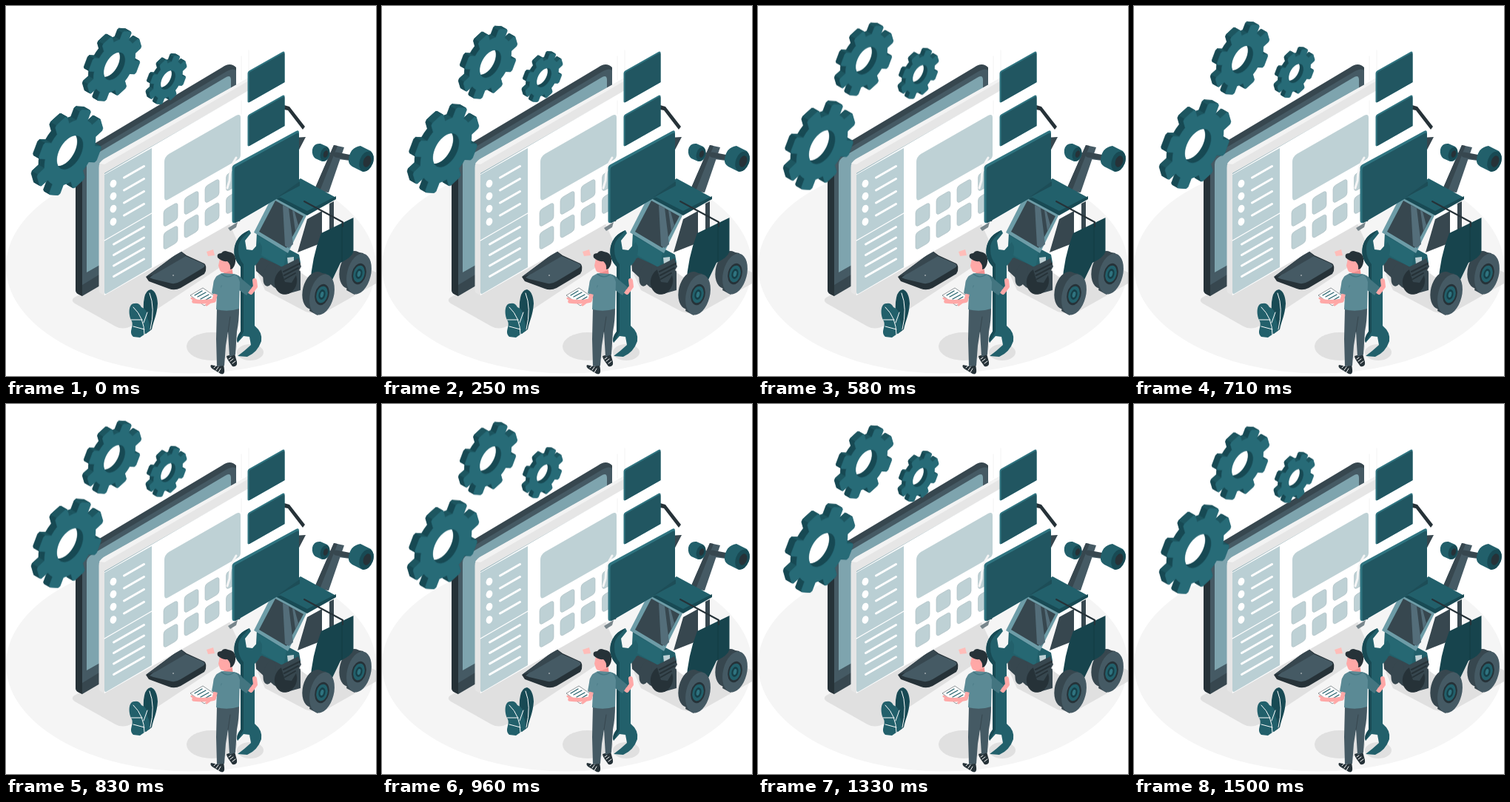
Write an HTML page that moves like this. It is 500 px wide and 500 px high and loops after 1.54 s.

```html
<!DOCTYPE html>
<html lang="en">
<head>
<meta charset="utf-8">
<title>Isometric workshop</title>
<style>
html, body { margin: 0; width: 100%; height: 100%; overflow: hidden; background: #fff; }
svg { display: block; width: 100vw; height: 100vh; }
.ln { fill: none; stroke-linecap: round; stroke-linejoin: round; }
#gears { animation: bob 1540ms linear -65ms infinite; }
@keyframes bob { 50% { transform: translateY(-10px); } }
</style>
</head>
<body>
<svg viewBox="0 0 500 500">
  <defs>
    <rect id="tile" x="-9.5" y="-11.5" width="19" height="23" rx="4" transform="skewY(-30)" fill="#bed1d5" stroke="#aebfc4" stroke-width=".6"/>
    <ellipse id="dot" rx="4.2" ry="5.4" transform="rotate(22)" fill="#fff"/>
    <g id="wheel">
      <g fill="#37474f">
        <ellipse cx="-11" cy="-3" rx="16" ry="26" transform="rotate(14)"/>
        <path d="M6-28L-5-30L-17 22L-6 28Z"/>
      </g>
      <g transform="rotate(14)">
        <ellipse rx="16" ry="28" fill="#455a64"/>
        <ellipse rx="9.5" ry="14.5" fill="#263238"/>
        <ellipse rx="7.5" ry="11.5" fill="#22606b"/>
        <ellipse rx="4.5" ry="7" fill="#173f48"/>
        <ellipse rx="2.2" ry="4" fill="#2f7480"/>
      </g>
    </g>
    <g id="slab">
      <path d="M-.5 29Q-.5 26.500 1.500 25.500L47 -.3Q49.500-1.300 49.500 1V41L2 68Q-.5 69.300-.5 67Z" fill="#2f7480"/>
      <path d="M1.500 30Q1.500 28 3 27L47.500 1.800Q49.500 1 49.500 3V41L1.500 68.300Z" fill="#215661"/>
    </g>
  </defs>

  <g id="ground">
    <ellipse cx="250" cy="352" rx="250" ry="144.5" fill="#f5f5f5"/>
    <g fill="#e0e0e0">
      <path d="M92 394L200 335L300 290L318 330L303 344L172 431Q159 439 148 433L93 402Q87 398 92 394Z"/>
      <path d="M340 362L440 330L500 360V375L436 411Q424 419 405 413L350 384Z"/>
      <ellipse cx="278" cy="460" rx="34" ry="19"/>
      <ellipse cx="330" cy="468" rx="18" ry="11"/>
    </g>
  </g>

  <g id="monitor">
    <path d="M94 208Q94 202 101 197L292 83Q303 75 311 83V270L103 392L97 389Q94 387 94 383Z" fill="#37474f"/>
    <path d="M94 208L103 212V392L97 389Q94 387 94 383Z" fill="#263238"/>
    <path d="M103 212Q103 204 110 200L297 89Q307 83 311 87V250L103 377Z" fill="#455a64"/>
    <path d="M109 214Q109 208 115 204L296 97Q304 92 304 100V250L109 360Z" fill="#7ea4ae"/>
    <path d="M189 366L236 331L244 337L268 348Q271 350 270 358L268 362L236 381Q228 385 220 382L193 372Z" fill="#263238"/>
    <path d="M194 367L236 334L243 338L266 348Q271 351 266 354L236 372Q228 377 220 374L199 369Z" fill="#455a64"/>
    <path d="M189 366L236 331L243 338L202 362Z" fill="#37474f"/>
    <circle cx="226" cy="364" r=".8" fill="#e0e0e0"/>
  </g>

  <g id="window">
    <path d="M125.5 219Q125 211 132 207L328 97V115L133 226V391L127.500 388Q125.500 387 125.500 384Z" fill="#e6e6e6"/>
    <path d="M126 213L132 207L328 97V101L133 214Z" fill="#f3f3f3"/>
    <path d="M133 227L328 114V280L133 391Z" fill="#fff"/>
    <path d="M133 228L197 192V353L137 388Q133 391 133 386Z" fill="#bacfd4"/>
    <path class="ln" d="M133 317L197 280" stroke="#fff" stroke-width="1.3"/>
    <use href="#dot" transform="translate(145 240)"/>
    <use href="#dot" transform="translate(145 257)"/>
    <use href="#dot" transform="translate(145 274)"/>
    <use href="#dot" transform="translate(145 291.500)"/>
    <path class="ln" stroke="#fff" stroke-width="3" d="M159.500 232l27-15.500m-27 32.500l27-15.500m-27 32.500l27-15.500m-27 32.500l27-15.500M145.500 322l41-23.500m-41 38l41-23.500m-41 38l41-23.500m-41 38l41-23.500"/>
    <path d="M214 211Q214 204 220 200L311 148Q317 145 317 151V201Q317 206 313 208L220 261Q214 265 214 258Z" fill="#bed1d5"/>
    <use href="#tile" transform="translate(222.500 282)"/>
    <use href="#tile" transform="translate(250.500 266)"/>
    <use href="#tile" transform="translate(278.500 250)"/>
    <use href="#tile" transform="translate(307 234)"/>
    <use href="#tile" transform="translate(222.500 313)"/>
    <use href="#tile" transform="translate(250.500 297.500)"/>
    <use href="#tile" transform="translate(278.500 281.500)"/>
    <use href="#tile" transform="translate(307 265)"/>
    <path class="ln" d="M311 205Q302 218 302 236L299 246" stroke="#f5f5f5" stroke-width="3"/>
    <path class="ln" d="M318 68V100M328 60V96M318 128V146" stroke="#f7f7f7" stroke-width="1.5"/>
  </g>

  <g id="loader">
    <path d="M376 134L383 136L404 163L401 167L381 141L376 140Z" fill="#263238"/>
    <path d="M388 178L405 177L393 200Z" fill="#37474f"/>
    <path class="ln" d="M424 200L484 208" stroke="#455a64" stroke-width="7"/>
    <path d="M443 188L457 191L436 252L416 250Z" fill="#455a64"/>
    <path d="M443 188L448 189L424 250H416Z" fill="#37474f"/>
    <path class="ln" d="M446 201L472 206" stroke="#37474f" stroke-width="7"/>
    <path d="M414 194Q416 185 425 186L434 190Q439 194 437 203Q434 211 427 210L418 206Q413 202 414 194Z" fill="#22606b"/>
    <ellipse cx="431" cy="200" rx="6" ry="9.500" transform="rotate(18 431 200)" fill="#184a54"/>
    <ellipse cx="432" cy="200" rx="3" ry="5" transform="rotate(18 432 200)" fill="#263238"/>
    <path d="M463 207Q465 191 479 189L493 196Q499 202 496 212Q490 225 482 224L468 217Q462 213 463 207Z" fill="#22606b"/>
    <ellipse cx="487" cy="210" rx="9" ry="14" transform="rotate(20 487 210)" fill="#184a54"/>
    <ellipse cx="488" cy="210" rx="5" ry="8" transform="rotate(20 488 210)" fill="#263238"/>

    <path d="M337 345L346 338L398 358V384L380 389L362 380L338 358Z" fill="#37474f"/>
    <ellipse cx="356" cy="363" rx="8" ry="16" transform="rotate(14 356 363)" fill="#37474f"/>
    <ellipse cx="378" cy="372" rx="15" ry="18" transform="rotate(14 378 372)" fill="#263238"/>
    <use href="#wheel" transform="translate(477 362)"/>
    <path d="M407 282L443 264V326L415 372L398 360L394 333Z" fill="#fff"/>
    <path d="M407 288L427 277V320L394 333Z" fill="#37474f"/>
    <path d="M437 267L443 264V306L437 310Z" fill="#37474f"/>
    <path d="M426 307L469.500 286V332Q467 340 452 347L440 372L411 378Q413 340 426 307Z" fill="#17444d"/>
    <path class="ln" d="M454 293V345" stroke="#123b43" stroke-width="1"/>
    <path d="M339 306L396 336L398 347L377 354L346 340L337 344Z" fill="#22606b"/>
    <path d="M339 310L379 333L375 354L340 334Z" fill="#266873"/>
    <path d="M380 340L389 339V346L381 349Z" fill="#bed1d5"/>
    <path d="M371 353L395 341L399 352L386 374L377 373Z" fill="#37474f"/>
    <path class="ln" d="M375 359L397 348M376 364L395 354M377 369L391 361" stroke="#263238" stroke-width="2"/>
    <path d="M361 255L407 281L381 334L335 306Z" fill="#6d9ca7"/>
    <path d="M364 263L402 284L379 327L342 305Z" fill="#37474f"/>
    <path d="M374 269L382 273L388 322L382 327L377 324ZM387 276L390 278L395 296L391 304Z" fill="#546e7a"/>
    <path d="M366 256L398 233L446 259L407 281Z" fill="#22606b"/>
    <path d="M366 256L407 277L446 257V261L407 283L366 261Z" fill="#184a54"/>
    <path class="ln" d="M403 264L455 292V298" stroke="#263238" stroke-width="2"/>
    <use href="#wheel" transform="translate(427 390)"/>
    <path d="M300 300L313 292L311 299L303 304Z" fill="#78868c"/>
    <path d="M309 292L316 280L320 277L316 291Z" fill="#455a64"/>
  </g>

  <g id="panels">
    <use href="#slab" x="327" y="62"/>
    <use href="#slab" x="327" y="121"/>
    <path d="M305.500 219Q305.500 216 309 214L392 169Q396 167 396 171V243L310 293Q305.500 294 305.500 290Z" fill="#2f7480"/>
    <path d="M308.500 221Q308.500 218 311 217L393 172Q396 171 396 174V243L310 293L308.500 292Z" fill="#215661"/>
    <path d="M366 259L397 237V243Z" fill="#1d4d57"/>
  </g>

  <g id="plant">
    <path d="M189 443C190 428 183 411 187 394Q189 384 196 383Q204 386 205 402C204 418 199 426 197 437Z" fill="#184a54"/>
    <path d="M172 447C165 440 173 434 170 426C165 418 165 401 174 402Q180 401 183 407Q192 410 191 422Q195 429 194 439L181 448Z" fill="#22606b"/>
    <path class="ln" d="M187 444Q187 421 172 407M186 428L191 414M184 424L169 424M187 437L172 433M195 437Q202 408 194 388" stroke="#fff" stroke-width="1"/>
  </g>

  <g id="wrench">
    <path d="M317 440V352Q306 341 309 325Q313 309 329 303L331 307L323 317L325 329L333 330L343 319L346 325Q347 342 336 351V432Q347 441 345 453Q340 468 326 474L313 473L322 466L331 458L329 447L321 446L313 455Q310 449 317 440Z" fill="#22606b"/>
    <path d="M317 440V352Q306 341 309 325Q313 309 329 303L324 309Q313 318 314 329Q314 341 321 349V440L313 455Q310 449 317 440Z" fill="#184a54"/>
  </g>

  <g id="worker">
    <path d="M271 332L280 329L282 337L273 338Z" fill="#ffbdb9"/>
    <path d="M277 485Q275 488 280 491L290 497Q296 499 295 491L294 484L287 487ZM298 473Q298 476 301 480L306 487Q313 488 312 481L309 470Z" fill="#263238"/>
    <path class="ln" d="M281 489l3-3m0 6l3-4m0 7l3-5M301 477l3-2m-1 5l4-3m-1 6l4-3" stroke="#fff" stroke-width="1"/>
    <path d="M285 408L315 408Q315 425 312 440L310 471L302 474L300 440L297 459L295 486L285 487L284 450Z" fill="#455a64"/>
    <path class="ln" d="M300 440L303 420" stroke="#37474f" stroke-width="1"/>
    <path d="M293 355L305 351L307 365L296 367Z" fill="#f28f8f"/>
    <path class="ln" d="M326 383L331 387L337 379L336 371" stroke="#ffa8a7" stroke-width="6"/>
    <path d="M308 362Q315 363 320 370L332 380L325 391L312 382Z" fill="#437580"/>
    <path d="M281 371Q284 363 293 361L307 362Q314 364 316 373L315 409Q300 414 284 410L285 391L279 389Z" fill="#5b8a95"/>
    <path class="ln" d="M285 391L291 378M291 362Q299 369 308 363" stroke="#437580" stroke-width="1.200"/>
    <path d="M249 391L266 381L285 394L268 405Z" fill="#fff" stroke="#263238" stroke-width=".5"/>
    <path class="ln" d="M255 391l10-6m-6 8l11-6m-7 9l11-6m-7 9l10-6" stroke="#22606b" stroke-width="1.200"/>
    <path class="ln" d="M283 390L281 398Q270 401 254 399" stroke="#ffa8a7" stroke-width="5.500"/>
    <path class="ln" d="M251 395L257 398M271 404L275 401" stroke="#ffa8a7" stroke-width="3"/>
    <path d="M281 371L291 371L290 391L278 388Z" fill="#5b8a95"/>
    <path d="M289 341L287 351L289 357Q291 361 297 360L305 357L305 343Z" fill="#ffa8a7"/>
    <path d="M286 340Q284 334 291 334Q294 329 300 332Q309 333 310 341Q311 349 306 355L303 356Q304 349 299 345Q292 346 286 340Z" fill="#263238"/>
    <ellipse cx="297.500" cy="349.500" rx="2.500" ry="3.500" fill="#ffa8a7"/>
  </g>

  <g id="gears"></g>
</svg>
<script>
const TEETH = 8, PHASE = -61, ROOT = 0.77, HOLE = 0.4;
const gears = document.getElementById('gears');

// Point on the left-to-right isometric wall.
const iso = (r, deg) => {
  const a = deg * Math.PI / 180, u = r * Math.cos(a);
  return [0.866 * u, r * Math.sin(a) - 0.5 * u];
};
const pathOf = pts => 'M' + pts.map(p => p.map(n => n.toFixed(2))).join('L') + 'Z';

function add(d, fill, x, y) {
  const p = document.createElementNS('http://www.w3.org/2000/svg', 'path');
  const attrs = { d, fill, stroke: fill, 'stroke-width': 0.6, 'stroke-linejoin': 'round',
    'fill-rule': 'evenodd', transform: `translate(${x} ${y})` };
  for (const k in attrs) p.setAttribute(k, attrs[k]);
  gears.append(p);
}

function gear(cx, cy, R, dx, dy) {
  const rim = [], hole = [];
  for (let i = 0; i < TEETH; i++) {
    const a = PHASE + i * 360 / TEETH;
    rim.push(iso(R * ROOT, a - 14), iso(R * 0.97, a - 11), iso(R, a - 8),
      iso(R, a + 8), iso(R * 0.97, a + 11), iso(R * ROOT, a + 14), iso(R * ROOT, a + 22.5));
  }
  for (let a = 0; a < 360; a += 6) hole.push(iso(R * HOLE, a));
  const face = pathOf(rim) + pathOf(hole);

  const layers = Math.ceil(Math.hypot(dx, dy) * 1.5);
  for (let i = layers; i > 0; i--) add(face, '#184a54', cx + dx * i / layers, cy + dy * i / layers);

  // Upward-facing sides catch a little more light.
  rim.forEach((p, i) => {
    const q = rim[(i + 1) % rim.length], ex = q[0] - p[0], ey = q[1] - p[1];
    if (ex > 0 && ey * dx - ex * dy > 0 && ex > Math.abs(ey))
      add(pathOf([p, q, [q[0] + dx, q[1] + dy], [p[0] + dx, p[1] + dy]]), '#1d5660', cx, cy);
  });
  add(face, '#276b77', cx, cy);
}

gear(146.5, 82.3, 42.3, -7, -4);
gear(219, 101, 29.3, -5, -2.9);
gear(86.5, 199, 51.8, -8, -4.6);
</script>
</body>
</html>
```
